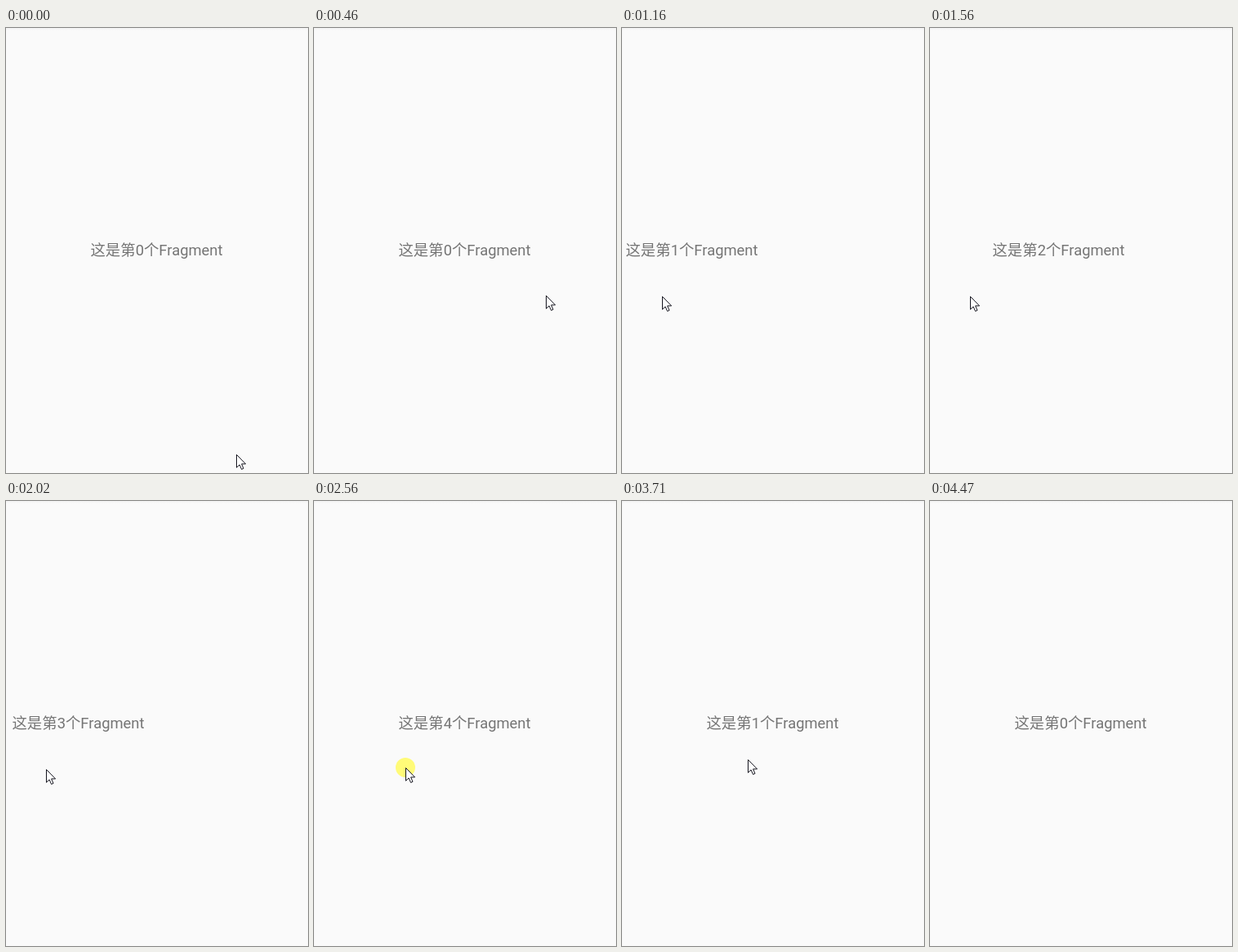
An HTML page that plays this animation: 370x546 px, repeating every 4720 ms.

```html
<!DOCTYPE html>
<html lang="zh-CN">
<head>
<meta charset="utf-8">
<title>Fragment pager</title>
<style>
  html, body { margin: 0; width: 100%; height: 100%; overflow: hidden; background: #fafafa; }
  svg { display: block; width: 370px; height: 546px; }
  text { font: 18.4px Roboto, "Noto Sans CJK SC", "Noto Sans CJK", sans-serif; fill: #757575; text-anchor: middle; }
</style>
</head>
<body>
<svg viewBox="0 0 370 546">
  <defs>
    <linearGradient id="shade" x2="0" y2="1">
      <stop stop-color="#f3f3f3"/>
      <stop offset="1" stop-color="#fafafa"/>
    </linearGradient>
  </defs>
  <rect width="370" height="546" fill="#fafafa"/>
  <rect width="370" height="3" fill="url(#shade)"/>
  <g id="pages"></g>
  <g id="pointer">
    <circle id="press" r="12" fill="#fffb78"/>
    <path d="M.5 .5V16.3L4.1 12.9L6.6 18.5L9 17.4L6.6 11.9H11.6Z" fill="#fff" stroke="#15151f"/>
  </g>
</svg>
<script>
const LOOP = 4720, TICK = 77.3, WIDTH = 370, TURN = 260;
const [pages, pointer, press] = ["pages", "pointer", "press"].map(id => document.getElementById(id));

// The pointer flicks from home to far, then returns for the next swipe
const entry = { x: 282, y: 523 }, exit = { x: -40, y: 500 };
const next = { step: 1, home: { x: 284, y: 328 }, far: { x: 49, y: 329 }, back: 116 };
const previous = { step: -1, home: { x: 112, y: 327 }, far: { x: 376, y: 330 }, back: 220 };
const swipes = [
  ...[0, 1, 2, 3].map(i => ({ ...next, start: 637 + 426 * i })),
  ...[2590, 3075, 3446, 4198].map(start => ({ ...previous, start }))
];

const clamp = x => Math.min(1, Math.max(0, x));
const smooth = x => (x = clamp(x), x * x * (3 - 2 * x));
const smoother = x => (x = clamp(x), x * x * x * (x * (6 * x - 15) + 10));
const mix = (a, b, k) => ({ x: a.x + (b.x - a.x) * k, y: a.y + (b.y - a.y) * k });

function pageAt(t) {
  return swipes.reduce((page, { start, step }) => page + step * smoother((t - start) / TURN), 0);
}

function pointerAt(t) {
  const index = swipes.findLastIndex(({ start }) => t > start - 30);
  if (index < 0) return mix(entry, next.home, clamp(t / 230));
  const { start, home, far, back } = swipes[index];
  const age = t - start;
  const target = swipes[index + 1]?.home ?? exit;
  const out = mix(home, far, smooth((age + 20) / 70));
  const point = mix(out, target, smooth((age - 100) / back));
  point.y -= 12 * Math.exp(-(((age - 240) / 70) ** 2));
  return point;
}

for (let i = 0; i < 5; i++) {
  const label = document.createElementNS("http://www.w3.org/2000/svg", "text");
  label.setAttribute("x", WIDTH * i + 184.5);
  label.setAttribute("y", 279);
  label.textContent = `这是第${i}个Fragment`;
  pages.append(label);
}

function move(node, x, y) {
  node.setAttribute("transform", `translate(${Math.round(x)} ${Math.round(y)})`);
}

function draw(time) {
  // The screen refreshes in coarse steps
  const t = Math.floor((time + 20) / TICK) * TICK;
  const { x, y } = pointerAt(t);
  const pressed = swipes.some(({ start }) => t > start - 150 && t < start + 25);
  move(pages, -pageAt(t) * WIDTH, 0);
  move(pointer, x, y);
  press.setAttribute("visibility", pressed ? "visible" : "hidden");
}

const origin = performance.now();
function frame() {
  draw((performance.now() - origin) % LOOP);
  requestAnimationFrame(frame);
}
frame();
</script>
</body>
</html>
```
